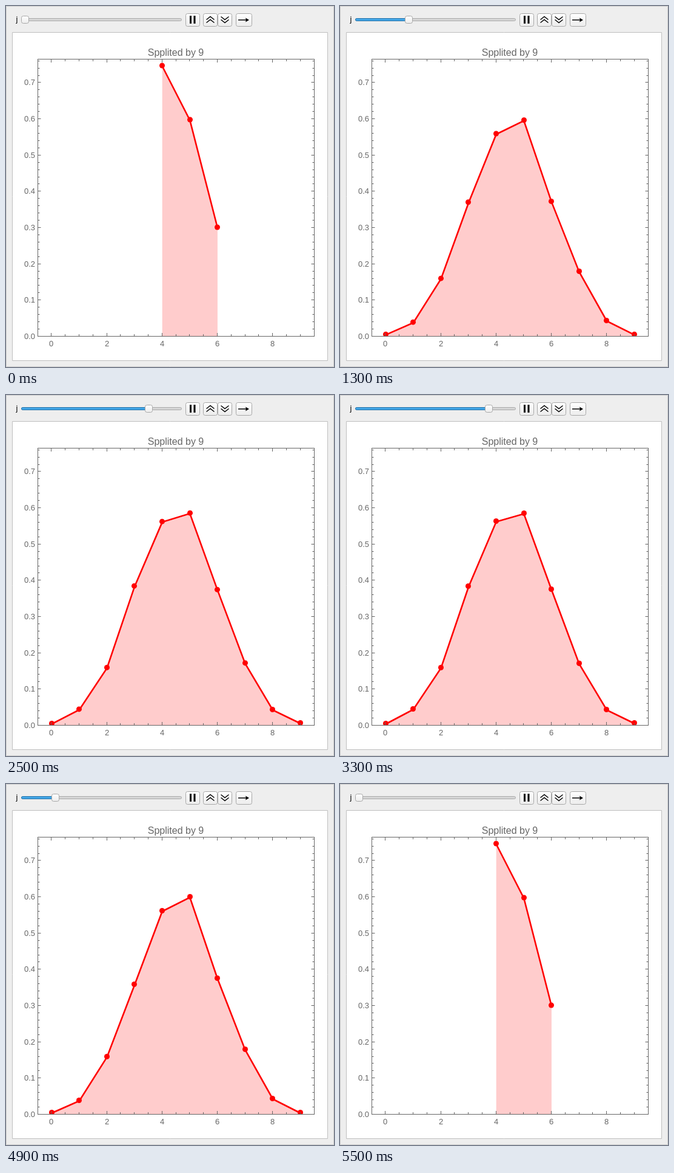
These frames come from a looping animation (541x594 px, 6 s). An HTML page with a canvas:

```html
<!DOCTYPE html>
<html>
<head>
<meta charset="utf-8">
<style>
html, body { margin: 0; width: 100%; height: 100%; overflow: hidden; background: #eee; }
canvas { display: block; }
</style>
</head>
<body>
<canvas id="stage" width="541" height="594"></canvas>
<script>
const ctx = document.getElementById('stage').getContext('2d');
const LEFT = 52.5, RIGHT = 508.5, TOP = 87.5, BASE = 543.5;
const UNIT_X = 45.6, UNIT_Y = 596.5;
const FONT = 'px "Liberation Sans", Arial, sans-serif';
const xAt = v => LEFT + (v + 0.5) * UNIT_X;

// step, slider offset, heights of the ten points in pixels
const KEYS = [
  [1, 0, 2, 25, 102, 208, 350, 347, 217, 100, 24, 1],
  [4, 30, 3, 26, 100, 206, 346, 350, 220, 103, 25, 2],
  [6, 50, 2, 22, 94, 213, 334, 357, 223, 106, 25, 2],
  [14, 134, 3, 23, 95, 231, 330, 351, 218, 106, 25, 3],
  [22, 214, 2, 26, 94, 228, 335, 348, 223, 101, 25, 3],
  [25, 245, 2, 26, 95, 227, 336, 347, 224, 100, 26, 3],
];

function stepAt(ms) {
  const t = ms % 6000;
  if (t < 500) return 0;
  if (t < 3100) return Math.min(25, Math.floor((t - 500) / 100) + 1);
  return Math.max(0, 24 - Math.floor((t - 3100) / 100));
}

function stateAt(step) {
  if (step === 0) return { offset: 0, first: 4, heights: [444.5, 355.5, 178.5] };
  const i = Math.max(1, KEYS.findIndex(key => key[0] >= step));
  const a = KEYS[i - 1], b = KEYS[i];
  const f = (step - a[0]) / (b[0] - a[0]);
  const [, offset, ...heights] = a.map((v, n) => v + (b[n] - v) * f);
  return { offset: Math.round(offset), first: 0, heights };
}

function box(x, y, w, h, r, fill, stroke) {
  ctx.beginPath();
  ctx.roundRect(x, y, w, h, r);
  ctx.fillStyle = fill;
  ctx.fill();
  ctx.strokeStyle = stroke;
  ctx.lineWidth = 1;
  ctx.stroke();
}

function path(points, color, width) {
  ctx.beginPath();
  points.forEach(([x, y]) => ctx.lineTo(x, y));
  ctx.strokeStyle = color;
  ctx.lineWidth = width;
  ctx.stroke();
}

function text(str, x, y, size, color, align) {
  ctx.font = size + FONT;
  ctx.fillStyle = color;
  ctx.textAlign = align;
  ctx.fillText(str, x, y);
}

function raised(x, y, w, h, r) {
  const g = ctx.createLinearGradient(0, y, 0, y + h);
  g.addColorStop(0, '#fff');
  g.addColorStop(1, '#ececec');
  box(x, y, w, h, r, g, '#a8a8a8');
}

function drawControls(offset) {
  text('j', 18, 26, 13, '#000', 'center');
  box(25.5, 20.5, 264, 4, 2, '#d6d6d6', '#ababab');
  if (offset) box(25.5, 20.5, offset + 6, 4, 2, '#43a6e6', '#2474ab');
  raised(25.5 + offset, 16.5, 12, 12, 3);

  for (const [x, w] of [[296.5, 23], [325.5, 23], [349.5, 23], [379.5, 26]]) raised(x, 12.5, w, 21, 3);
  ctx.fillStyle = '#000';
  ctx.fillRect(303, 16, 3, 13);
  ctx.fillRect(309.5, 16, 3, 13);
  for (const y of [17.5, 22.5]) {
    path([[330.5, y + 5], [337, y], [343.5, y + 5]], '#000', 1.4);
    path([[354.5, y], [361, y + 5], [367.5, y]], '#000', 1.4);
  }
  path([[383, 23], [397, 23]], '#000', 1.5);
  ctx.beginPath();
  ctx.moveTo(401, 23);
  ctx.lineTo(395, 19.5);
  ctx.lineTo(396, 23);
  ctx.lineTo(395, 26.5);
  ctx.fill();
}

function drawAxes() {
  ctx.strokeStyle = '#666';
  ctx.lineWidth = 1;
  ctx.strokeRect(LEFT, TOP, RIGHT - LEFT, BASE - TOP);
  ctx.fillStyle = '#666';
  for (let i = 0; i <= 18; i++) {
    const x = Math.floor(xAt(i / 2) - 0.5), major = i % 4 === 0, len = major ? 5 : 3;
    ctx.fillRect(x, TOP, 1, len + 0.5);
    ctx.fillRect(x, BASE - len - 0.5, 1, len + 0.5);
    if (major) text(String(i / 2), x + 0.5, 560, 13, '#666', 'center');
  }
  for (let i = 0; i <= 38; i++) {
    const y = Math.floor(BASE - i * 0.02 * UNIT_Y), major = i % 5 === 0, len = major ? 5 : 3;
    ctx.fillRect(LEFT, y, len, 1);
    ctx.fillRect(RIGHT - len, y, len, 1);
    if (major) text((i / 50).toFixed(1), 48, y + 4.5, 13, '#666', 'right');
  }
  text('Spplited by 9', 280, 82, 16, '#666', 'center');
}

function drawCurve({ first, heights }) {
  const points = heights.map((h, i) => [xAt(first + i), BASE - h]);
  const last = points.length - 1;
  ctx.save();
  ctx.beginPath();
  ctx.rect(LEFT, TOP, RIGHT - LEFT, BASE - TOP - 0.5);
  ctx.clip();
  ctx.beginPath();
  [[points[0][0], BASE], ...points, [points[last][0], BASE]].forEach(([x, y]) => ctx.lineTo(x, y));
  ctx.fillStyle = '#fcc';
  ctx.fill();
  path(points, '#f00', 2.6);
  ctx.fillStyle = '#f00';
  for (const [x, y] of points) {
    ctx.beginPath();
    ctx.arc(Math.floor(x - 0.3) + 0.5, y - 1, 4.5, 0, 7);
    ctx.fill();
  }
  ctx.restore();
}

function draw(now) {
  const state = stateAt(stepAt(now));
  box(0.5, 0.5, 540, 593, 0, '#eee', '#ccc');
  box(10.5, 43.5, 520, 540, 0, '#fff', '#bfbfbf');
  drawControls(state.offset);
  drawCurve(state);
  drawAxes();
}

const start = performance.now();
function loop() {
  draw(performance.now() - start);
  requestAnimationFrame(loop);
}
loop();
</script>
</body>
</html>
```
